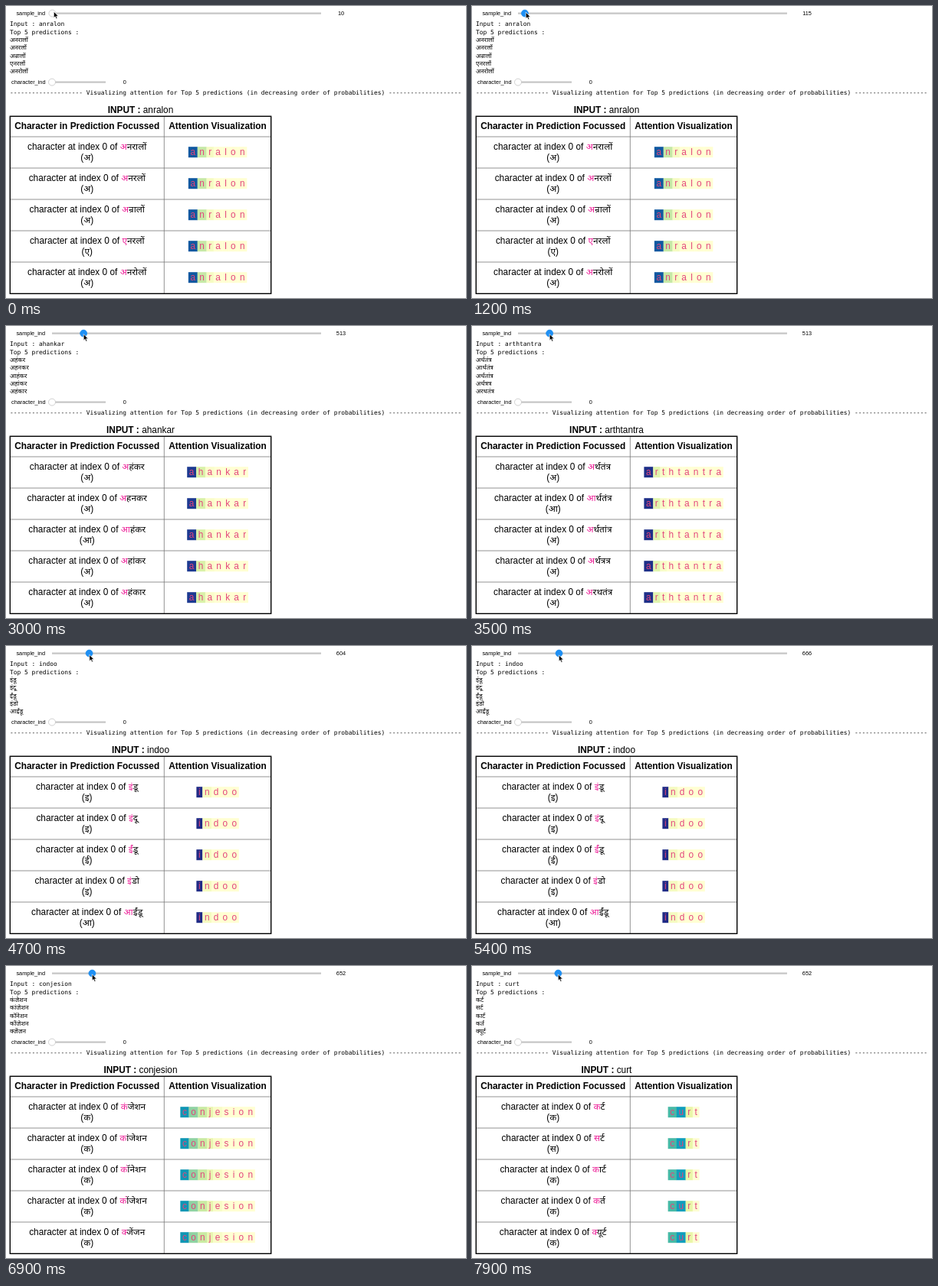
An HTML page that plays this animation: 600 by 382 pixels, repeating every 8 s.

```html
<!DOCTYPE html>
<html lang="en">
<head>
<meta charset="utf-8">
<title>Attention visualization</title>
<style>
  html, body { margin: 0; width: 100%; height: 100%; overflow: hidden; background: #fff; }
  svg { display: block; width: 100vw; height: 100vh; }
  text { font: 11.85px "Liberation Sans", "Noto Sans", "Noto Sans Devanagari", sans-serif; white-space: pre; }
  .bold { font-weight: bold; }
  .label { font-size: 7.35px; }
  .mono { font: 7.9px "DejaVu Sans Mono", monospace; }
  .small { font-size: 8.2px; }
  .mid { text-anchor: middle; }
  .end { text-anchor: end; }
</style>
</head>
<body>
<svg id="stage" viewBox="0 0 600 382"></svg>
<script>
const LOOP = 8000, STEP = 100;
const FONT = '"Liberation Sans", "Noto Sans", "Noto Sans Devanagari", sans-serif';
const PINK = '#ec1c96', LETTER = '#e3457c', PALE = '#ffffd2';
const stage = document.getElementById('stage');
const pen = document.createElement('canvas').getContext('2d');

function width(str, weight = '') {
  pen.font = `${weight} 118.5px ${FONT}`;
  return pen.measureText(str).width / 10;
}

function add(parent, tag, attrs, content = '') {
  const node = document.createElementNS('http://www.w3.org/2000/svg', tag);
  for (const key in attrs) node.setAttribute(key, attrs[key]);
  node.textContent = content;
  return parent.appendChild(node);
}

const write = (parent, x, y, str, cls = '', fill = '#000') =>
  add(parent, 'text', { x, y, class: cls, fill }, str);

const line = (x1, y1, x2, y2, stroke, w) =>
  add(stage, 'line', { x1, y1, x2, y2, stroke, 'stroke-width': w });

// Each scene: start time, input word, leading cell colours, predictions
const scenes = [
  { at: 0, input: 'anralon', heat: ['#0f58a0', '#c6e8a6', '#f5fbc2'],
    words: ['अनरालों', 'अनरलों', 'अन्रालों', 'एनरलों', 'अनरोलों'] },
  { at: 1900, input: 'ahankar', heat: ['#1d3a91', '#d9f1a8', '#fafdca'],
    words: ['अहंकर', 'अहनकर', 'आहंकर', 'अहांकर', 'अहंकार'] },
  { at: 3100, input: 'arthtantra', heat: ['#1e2f88', '#e0f4ae', '#f8fcc8'],
    words: ['अर्थतंत्र', 'आर्थतंत्र', 'अर्थतांत्र', 'अर्थत्रत्र', 'अरथतंत्र'] },
  { at: 4300, input: 'indoo', heat: ['#1f2b86', '#f5fbc0'],
    words: ['इंडू', 'इंदू', 'ईंडू', 'इंडो', 'आईंडू'] },
  { at: 5500, input: 'conjesion', heat: ['#0f96b4', '#8fd2a2', '#c9eaa2', '#e9f6b0', '#f8fcc6'],
    words: ['कंजेशन', 'कांजेशन', 'कॉनेशन', 'कोंजेशन', 'क्जेंजन'] },
  { at: 7000, input: 'curt', heat: ['#48b9a6', '#0f9ebc', '#eaf6a8', '#fdfdd2'],
    words: ['कर्ट', 'सर्ट', 'कार्ट', 'कर्त', 'क्यूर्ट'] },
];

function drawPrediction(group, word, y, id) {
  const lead = 'character at index 0 of ';
  const start = 105.7 - (width(lead) + width(word)) / 2;
  const x = start + width(lead);
  const head = word[1] === '्' ? word.slice(0, 2) + '\u200d' : word[0];
  const clip = add(group, 'clipPath', { id });
  add(clip, 'rect', { x: x - 2, y: y - 18, width: width(head) + 2, height: 26 });
  const rest = add(group, 'clipPath', { id: id + 'r' });
  add(rest, 'rect', { x: x + width(head), y: y - 18, width: 80, height: 26 });
  write(group, start, y, lead);
  write(group, x, y, word).setAttribute('clip-path', `url(#${id}r)`);
  write(group, x, y, word, '', PINK).setAttribute('clip-path', `url(#${id})`);
  write(group, 105.7, y + 14.2, `(${word[0]})`, 'mid');
}

function drawHeat(group, input, heat, y) {
  const pad = 5.25;
  let x = 276 - (width(input) + pad * input.length) / 2;
  [...input].forEach((letter, i) => {
    const w = width(letter) + pad;
    add(group, 'rect', { x, y, width: w + 0.2, height: 14, fill: heat[i] || PALE });
    write(group, x + w / 2, y + 11, letter, 'mid', LETTER);
    x += w;
  });
}

function buildScene({ input, heat, words }, n) {
  const group = add(stage, 'g', {});
  write(group, 5, 26.2, 'Input : ' + input, 'mono');
  const title = 'INPUT : ';
  const start = 175.5 - (width(title, 'bold') + width(input)) / 2;
  write(group, start, 139.8, title, 'bold');
  write(group, start + width(title, 'bold'), 139.8, input);
  words.forEach((word, i) => {
    write(group, 5, 47 + i * 10.25, word, 'small');
    drawPrediction(group, word, 187.6 + i * 41, `head${n}-${i}`);
    drawHeat(group, input, heat, 184.2 + i * 41);
  });
  return group;
}

function track(y, end) {
  line(60, y, end, y, '#c6c6c6', 2.4);
  return add(stage, 'circle', { cx: 60, cy: y, r: 4.5, fill: '#fff', stroke: '#bdbdbd', 'stroke-width': 0.7 });
}

// Fixed parts
write(stage, 51, 12, 'sample_ind', 'label end');
write(stage, 51.5, 102.2, 'character_ind', 'label end');
write(stage, 154.8, 102.2, '0', 'label mid');
write(stage, 5, 36.6, 'Top 5 predictions :', 'mono');
const dashes = '-'.repeat(20);
write(stage, 5, 116.2, `${dashes} Visualizing attention for Top 5 predictions (in decreasing order of probabilities) ${dashes}`, 'mono');
write(stage, 105.7, 161.2, 'Character in Prediction Focussed', 'bold mid');
write(stage, 276, 161.2, 'Attention Visualization', 'bold mid');
for (let i = 0; i < 5; i++) line(5, 171 + i * 41, 346, 171 + i * 41, '#777', 0.8);
line(206.3, 144, 206.3, 376, '#777', 0.8);
add(stage, 'rect', { x: 5.3, y: 144.3, width: 340.4, height: 232, fill: 'none', stroke: '#000', 'stroke-width': 1.4 });

const groups = scenes.map(buildScene);
track(99.6, 130);
const knob = track(9.6, 411);
const value = write(stage, 437, 12, '', 'label mid');
const cursor = add(stage, 'path', {
  d: 'M0 0V8.3L1.9 6.6L3.2 9.6L4.7 9L3.4 6.1H6Z',
  fill: '#000', stroke: '#fff', 'stroke-width': 0.7,
});

// time, sample value, cursor x, cursor y
const keys = [
  [0, 10, 62.3, 7.2], [500, 10, 61.5, 8], [1000, 115, 70.2, 8.2],
  [1300, 115, 70.2, 8.2], [1600, 143, 71.3, 8.4], [2200, 143, 71.3, 8.4],
  [2900, 513, 101.2, 10.6], [3600, 513, 101.2, 10.6], [4100, 604, 108.8, 11.4],
  [4800, 604, 108.8, 11.4], [5250, 666, 113.3, 11.8], [6300, 666, 113.3, 11.8],
  [6800, 652, 112.3, 10.8], [LOOP, 652, 112.3, 10.8],
];

function pose(t) {
  const i = keys.findIndex(key => key[0] > t);
  const a = keys[i - 1], b = keys[i];
  const p = (t - a[0]) / (b[0] - a[0]);
  const ease = p * p * (3 - 2 * p);
  return a.map((v, k) => v + (b[k] - v) * ease);
}

function render(t) {
  const [, sample, x, y] = pose(t);
  const current = scenes.filter(scene => scene.at <= t).length - 1;
  groups.forEach((group, i) => group.setAttribute('display', i === current ? 'inline' : 'none'));
  const active = t >= 400;
  knob.setAttribute('cx', 59.6 + sample * 0.081);
  knob.setAttribute('fill', active ? '#1e90f5' : '#fff');
  knob.setAttribute('stroke', active ? '#1e88e5' : '#bdbdbd');
  value.textContent = Math.round(sample);
  cursor.setAttribute('transform', `translate(${x} ${y})`);
}

const begin = performance.now();
function tick() {
  const t = (performance.now() - begin) % LOOP;
  render(Math.floor(t / STEP) * STEP);
  requestAnimationFrame(tick);
}
tick();
</script>
</body>
</html>
```
